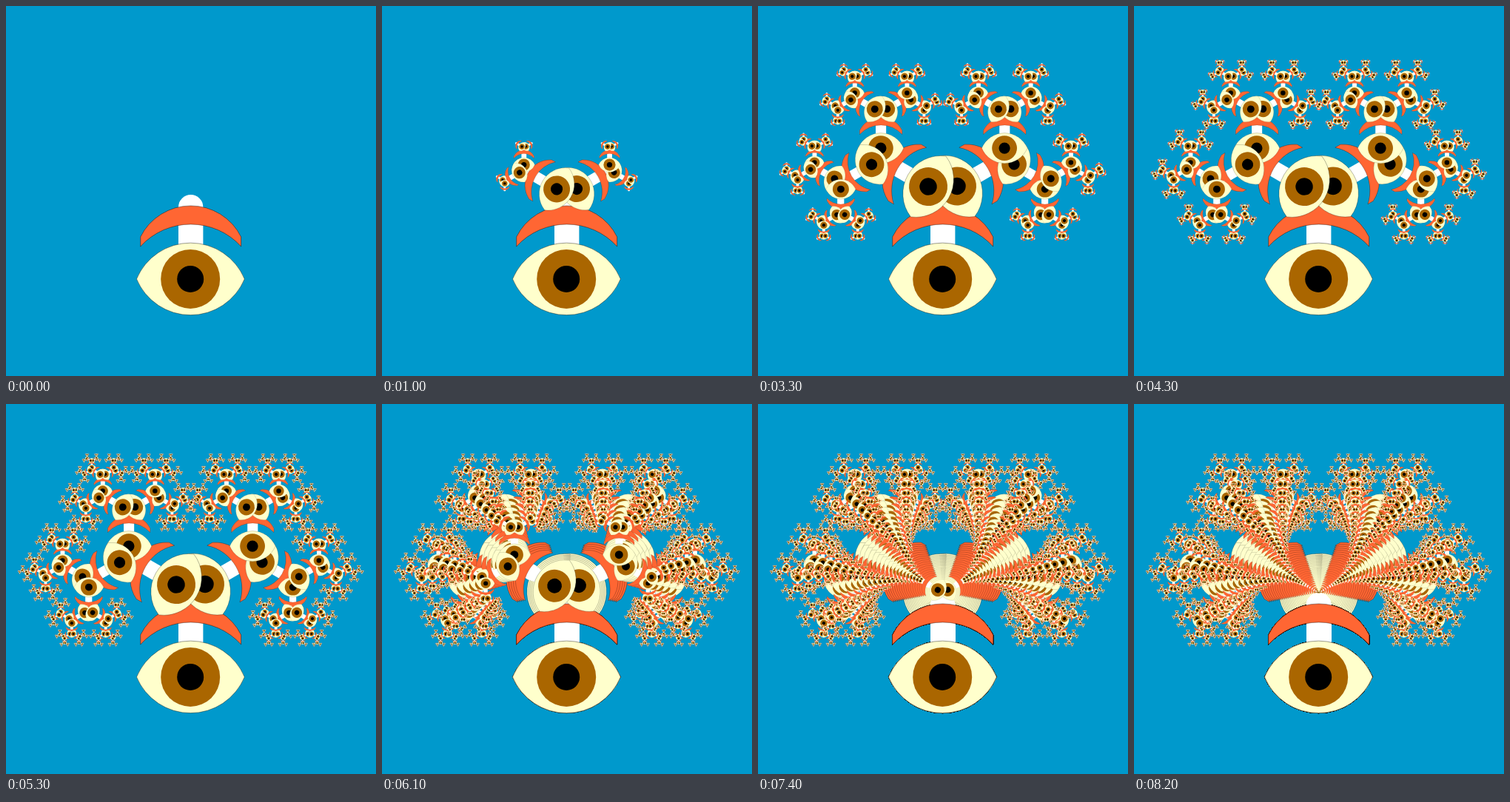
These frames come from a looping animation (500 by 500 pixels, 8300 ms). An HTML page with a canvas:

```html
<!DOCTYPE html>
<html lang="en">
<head>
<meta charset="utf-8">
<title>Eye tree</title>
<style>
html, body { margin: 0; width: 100%; height: 100%; overflow: hidden; background: #09c; }
canvas { display: block; }
</style>
</head>
<body>
<canvas id="stage" width="500" height="500"></canvas>
<script>
const ctx = document.getElementById('stage').getContext('2d');

const LOOP = 8300;
const TICK = 100;
const HOLDS = [2300, 3300, 4300, 4800, 5300];
const GROW_END = 1300;
const TRAIL_START = 5800;
const LAST_GROW = 15;
const FIRST_TRAIL = 19;

const ROOT = { x: 249.7, y: 403.5 };
const LENGTH = 148.5;
const SPREAD = Math.PI / 3;

// Shapes of one branch: the origin is its root, y points down.
const stem = new Path2D('M-16.7 -70 V-131.8 A16.7 16.7 0 0 1 16.7 -131.8 V-70 Z');
const brow = new Path2D('M-68 -78.5 V-91.5 A76 76 0 0 1 68 -91.5 V-78.5 A92 92 0 0 0 -68 -78.5 Z');
const eye = new Path2D('M-73.2 -34.6 A78.9 78.9 0 0 1 72.6 -34.6 A78.9 78.9 0 0 1 -73.2 -34.6 Z');
const iris = disc(40);
const pupil = disc(18);

function disc(r) {
  const p = new Path2D();
  p.arc(-0.5, -34.6, r, 0, Math.PI * 2);
  return p;
}

function fill(path, color, outlined) {
  ctx.fillStyle = color;
  ctx.fill(path);
  if (outlined) ctx.stroke(path);
}

function branch(x, y, angle, size, ratio, least) {
  const c = Math.cos(angle) * size;
  const s = Math.sin(angle) * size;
  ctx.setTransform(c, s, -s, c, x, y);
  fill(stem, '#fff');
  fill(brow, '#f63', true);
  fill(eye, '#ffc', true);
  fill(iris, '#a60');
  fill(pupil, '#000');

  const next = size * ratio;
  if (next < least) return;
  const tx = x + s * LENGTH;
  const ty = y - c * LENGTH;
  branch(tx, ty, angle + SPREAD, next, ratio, least);
  branch(tx, ty, angle - SPREAD, next, ratio, least);
}

function stepAt(t) {
  if (t < GROW_END) return Math.floor(t / TICK);
  if (t >= TRAIL_START) return FIRST_TRAIL + Math.floor((t - TRAIL_START) / TICK);
  return GROW_END / TICK + HOLDS.filter(h => h <= t).length;
}

function ratioAt(step) {
  if (step < FIRST_TRAIL) return 0.05 + 0.04 * Math.min(step, LAST_GROW);
  return 0.65 - 0.025 * (step - FIRST_TRAIL + 1);
}

// Smallest branch that is still drawn.
function leastAt(step) {
  if (step <= LAST_GROW) return 0.065;
  return Math.max(0.02, 0.04 - 0.01 * (step - LAST_GROW - 1));
}

function drawStep(step) {
  if (step < FIRST_TRAIL) {
    ctx.setTransform(1, 0, 0, 1, 0, 0);
    ctx.fillStyle = '#09c';
    ctx.fillRect(0, 0, 500, 500);
  }
  ctx.strokeStyle = '#000';
  ctx.lineWidth = 0.4;
  branch(ROOT.x, ROOT.y, 0, 1, ratioAt(step), leastAt(step));
}

let shown = -1;
const start = performance.now();

function render() {
  const step = stepAt((performance.now() - start) % LOOP);
  if (step !== shown) {
    // Trail steps pile up on the full tree, so any missed ones are caught up.
    let from = step;
    if (step >= FIRST_TRAIL) {
      from = shown < FIRST_TRAIL - 1 || shown > step ? FIRST_TRAIL - 1 : shown + 1;
    }
    for (let i = from; i <= step; i++) drawStep(i);
    shown = step;
  }
  requestAnimationFrame(render);
}
render();
</script>
</body>
</html>
```
